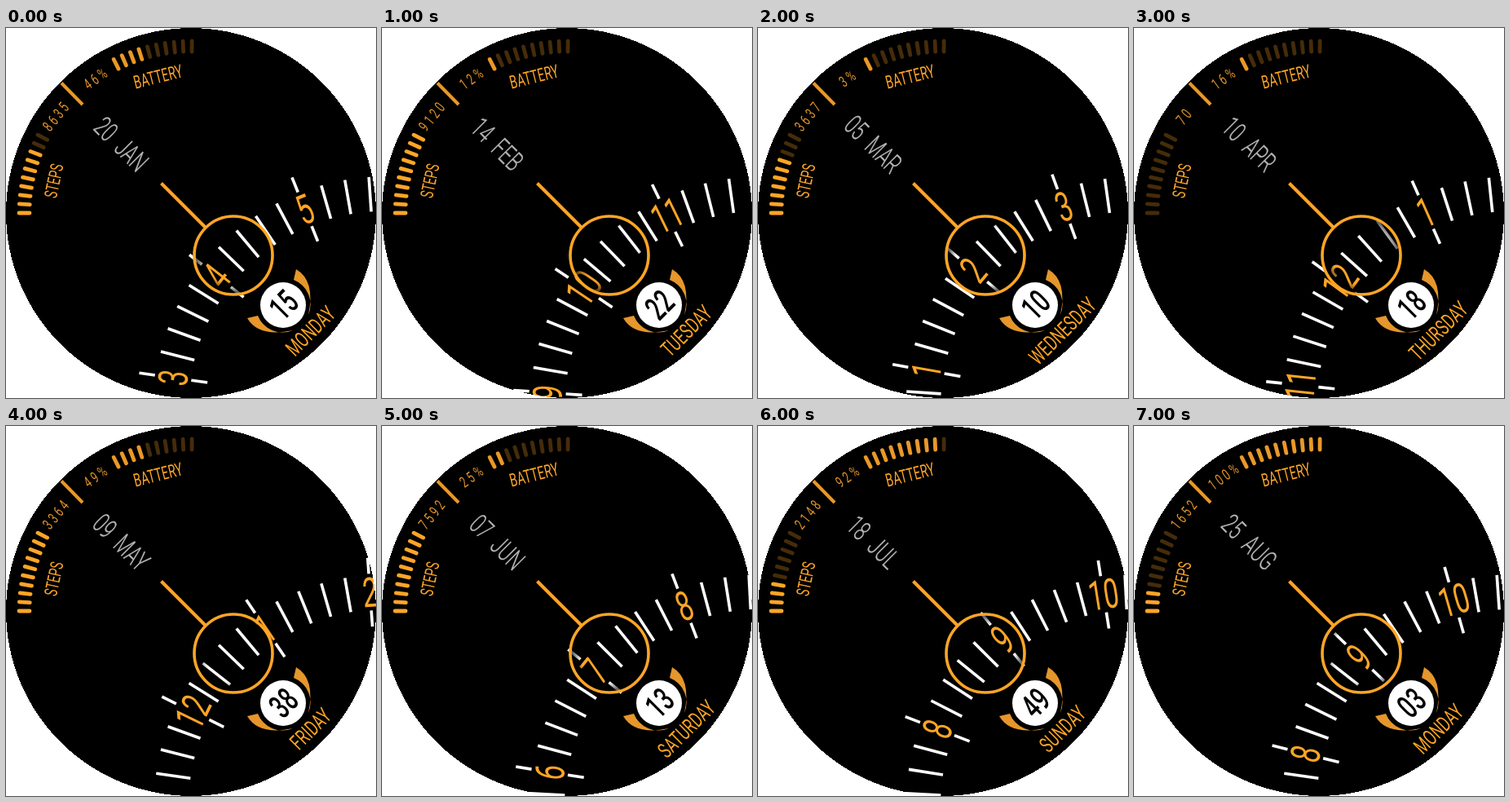
An HTML page for the animation above (8 s loop, 454 by 454 pixels).

```html
<!DOCTYPE html>
<html lang="en">
<head>
<meta charset="utf-8">
<title>Watch face</title>
<style>
  html, body { margin: 0; width: 100%; height: 100%; overflow: hidden; background: #000; }
  svg { display: block; width: 100vw; height: 100vh; }
  text { font-family: Roboto, "Open Sans", sans-serif; text-anchor: middle; fill: #ffa526; }
  .date { font-weight: 300; word-spacing: 10px; fill: #b8b8b8; stroke: #b8b8b8; stroke-width: .4px; }
  .minute { font-weight: 500; fill: #000; }
  .day { letter-spacing: .3px; }
  .count { letter-spacing: 5.5px; fill: #e2932a; }
</style>
</head>
<body>
<svg id="face" viewBox="0 0 454 454">
  <defs>
    <radialGradient id="shade" gradientUnits="userSpaceOnUse" cx="279" cy="279" r="48">
      <stop offset=".74" stop-opacity="0"/>
      <stop offset=".93" stop-opacity=".6"/>
    </radialGradient>
  </defs>
  <rect width="454" height="454"/>
  <g id="ring"></g>
  <circle cx="279" cy="279" r="47" fill="url(#shade)"/>
  <g fill="none" stroke="#ffa526">
    <circle cx="279" cy="279" r="48" stroke-width="3.6"/>
    <path d="M190.500 190.500L245 245" stroke-width="4"/>
    <path d="M68 67.500L94 94" stroke="#ea9828" stroke-width="4"/>
  </g>
  <g fill="#e6962a">
    <path id="horn" d="M296 356Q310 380 352 371A32.500 32.500 0 0 1 309 353Z"/>
    <use href="#horn" transform="matrix(0 1 1 0 0 0)"/>
  </g>
  <circle cx="340" cy="340" r="28" fill="#fff"/>
  <g id="gauges" transform="translate(227 227)"></g>
  <g id="info"></g>
  <path d="M0 0H454V454H0ZM0 227a227 227 0 0 0 454 0a227 227 0 0 0 -454 0Z"
        fill="#fff" fill-rule="evenodd" shape-rendering="crispEdges"/>
</svg>
<script>
const NS = 'http://www.w3.org/2000/svg';
const ORANGE = '#ffa526', AMBER = '#ea9828', DIM = '#452c0a';
const CONDENSE = 0.65, CAP = 0.711, HOLD = 1000;

const MONTHS = ['JAN', 'FEB', 'MAR', 'APR', 'MAY', 'JUN', 'JUL', 'AUG'];
const DAYS = ['MONDAY', 'TUESDAY', 'WEDNESDAY', 'THURSDAY', 'FRIDAY', 'SATURDAY', 'SUNDAY'];

// day of month, hour, minute, steps, lit step bars, battery, lit battery bars
const STATES = [
  ['20', 4, 15, 8635, 8, 46, 4],
  ['14', 10, 22, 9120, 10, 12, 1],
  ['05', 2, 10, 3637, 7, 3, 1],
  ['10', 12, 18, 70, 0, 16, 1],
  ['09', 12, 38, 3364, 10, 49, 4],
  ['07', 7, 13, 7592, 10, 25, 2],
  ['18', 8, 49, 2148, 4, 92, 9],
  ['25', 9, 3, 1652, 3, 100, 10]
];

const byId = id => document.getElementById(id);
const ring = byId('ring'), gauges = byId('gauges'), info = byId('info');

function add(parent, tag, attrs) {
  const el = document.createElementNS(NS, tag);
  for (const key in attrs) el.setAttribute(key, attrs[key]);
  return parent.appendChild(el);
}

// Condensed caps, centred on (x, y) and turned by deg
function label(parent, x, y, deg, cap, content = '', cls = '') {
  const el = add(parent, 'text', {
    transform: `translate(${x} ${y}) rotate(${deg}) scale(${CONDENSE} 1)`,
    y: cap / 2, 'font-size': cap / CAP, class: cls
  });
  el.textContent = content;
  return el;
}

function spoke(parent, deg, from, to, stroke, width, cap = 'butt') {
  return add(parent, 'path', {
    d: `M0 ${-from}V${-to}`, stroke, 'stroke-width': width, 'stroke-linecap': cap,
    transform: `rotate(${deg})`
  });
}

function buildRing() {
  for (let i = 0; i < 60; i++) {
    const deg = i * 6 - 90;
    if (i % 5) {
      spoke(ring, deg, 241, 283.5, '#fff', 3.6);
    } else {
      spoke(ring, deg, 220, 240, '#fff', 3.6);
      spoke(ring, deg, 285, 304.5, '#fff', 3.6);
      const a = deg * Math.PI / 180;
      label(ring, 262.5 * Math.sin(a), -262.5 * Math.cos(a), deg, 36, i / 5 || 12);
    }
  }
}

const gauge = start => Array.from({ length: 10 }, (_, i) =>
  spoke(gauges, start + i * 3, 198, 211, DIM, 4.8, 'round'));

const light = (bars, n, color) => bars.forEach((bar, i) =>
  bar.setAttribute('stroke', i < n ? color : DIM));

buildRing();
const stepBars = gauge(-90), powerBars = gauge(-26.7);
label(info, 186.5, 59.5, -14, 16, 'BATTERY');
label(info, 58.5, 187.5, -78, 15.5, 'STEPS');
const stepText = label(info, 62, 107.5, -51, 13.5, '', 'count');
const powerText = label(info, 111, 61, -36, 13.5, '', 'count');
const dateText = label(info, 141.5, 142.5, 45, 24, '', 'date');
const minuteText = label(info, 340.5, 339.5, -45, 29, '', 'minute');
const dayText = label(info, 373.5, 371.5, -45, 19, '', 'day');

function show(n) {
  const [date, hour, minute, steps, stepLit, power, powerLit] = STATES[n];
  const turn = 45 - Math.floor(minute / 2) - hour * 30;
  ring.setAttribute('transform', `translate(465 465.7) rotate(${turn})`);
  light(stepBars, stepLit, ORANGE);
  light(powerBars, powerLit, AMBER);
  stepText.textContent = steps;
  powerText.textContent = power + '%';
  dateText.textContent = `${date} ${MONTHS[n]}`;
  minuteText.textContent = String(minute).padStart(2, '0');
  dayText.textContent = DAYS[n % 7];
}

const start = performance.now();
let shown = -1;

function tick() {
  const n = Math.floor((performance.now() - start) / HOLD) % STATES.length;
  if (n !== shown) show(shown = n);
  requestAnimationFrame(tick);
}
tick();
</script>
</body>
</html>
```
